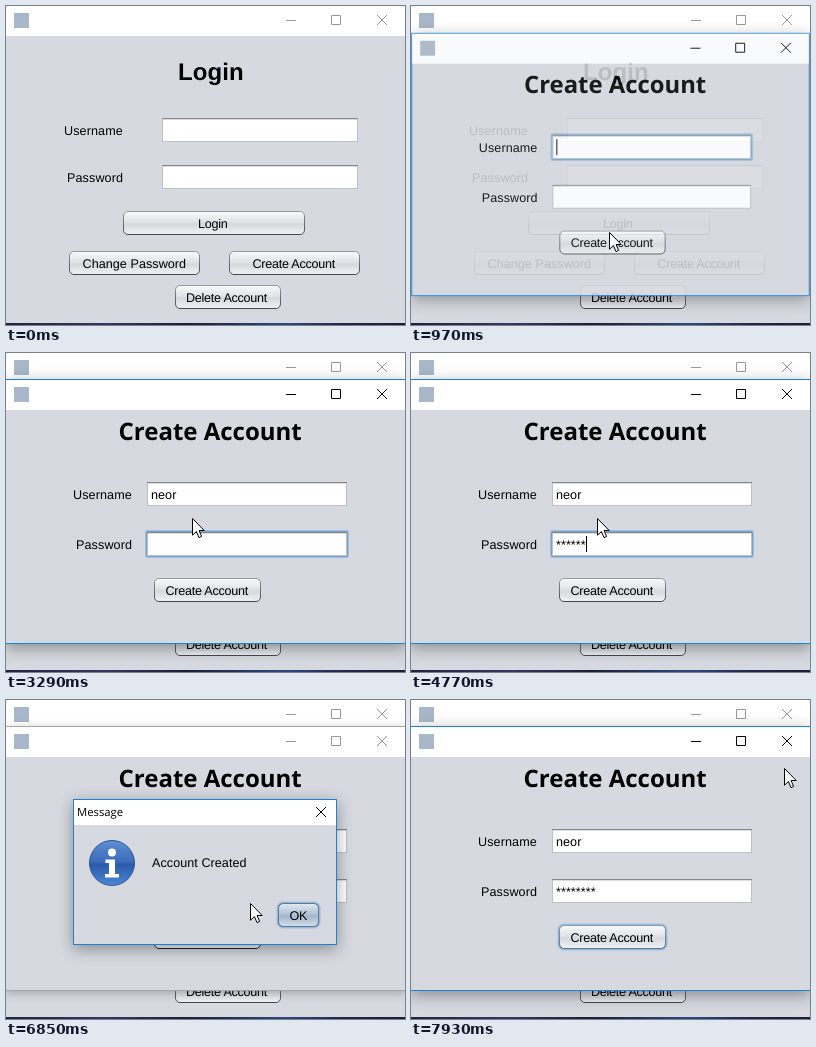
An HTML page that plays this animation: 399x319 px, repeating every 8000 ms.

```html
<!DOCTYPE html>
<html lang="en">
<head>
<meta charset="utf-8">
<title>Create account</title>
<style>
  html, body { margin: 0; width: 100%; height: 100%; overflow: hidden; background: #d6d9df; }
  svg { display: block; width: 399px; height: 319px; }
  text { font: 12.6px "Liberation Sans", Arial, sans-serif; letter-spacing: -.26px; fill: #000; white-space: pre; text-rendering: geometricPrecision; }
  .label { letter-spacing: .1px; }
  .typed { letter-spacing: .05px; }
  .h1 { font-size: 24px; font-weight: bold; letter-spacing: .1px; }
  .h2 { font: bold 24px "Noto Sans", "Open Sans", sans-serif; letter-spacing: 0; }
  .bar { font: 11.3px "Open Sans", "Noto Sans", sans-serif; letter-spacing: 0; }
  .glyphs { fill: none; stroke: #000; }
  .idle .glyphs { stroke: #999; }
  .frame { stroke: #1883d7; filter: drop-shadow(0 4px 8px rgba(0, 0, 0, .36)); }
  .idle > .frame { stroke: #a3a6ab; filter: drop-shadow(0 2px 5px rgba(0, 0, 0, .24)); }
  .btn .body { fill: url(#face); stroke: url(#edge); }
  .ring { fill: none; stroke: none; }
  .focus .ring { stroke: #73a4d1; }
  .focus .halo { stroke-opacity: .5; }
  .btn.hot .body { fill: url(#faceHot); stroke: url(#edgeHot); }
  .btn.down .body { fill: url(#faceDown); stroke: url(#edgeHot); }
  .btn.main .body { fill: url(#faceMain); stroke: #44536a; }
  .btn.main.hot .body { fill: url(#faceMainHot); }
  .btn.main.down .body { fill: url(#faceDown); }
</style>
</head>
<body>
<svg id="stage" viewBox="0 0 399 319"></svg>
<script>
const LOOP = 8000;
const stage = document.getElementById('stage');

const gradient = (id, dir, ...stops) =>
  `<linearGradient id="${id}" ${dir === 'down' ? 'x2="0" y2="1"' : ''}>${stops.map(([at, color]) =>
    `<stop offset="${at}" stop-color="${color}"/>`).join('')}</linearGradient>`;

const text = (x, y, s, cls = '', id = '') => `<text id="${id}" class="${cls}" x="${x}" y="${y}">${s}</text>`;

// Focus ring: a solid line hugging the control and a softer one outside it
const ring = (x, y, w, h, r) => [.5, 1.5].map((d, i) =>
  `<rect class="ring ${i ? 'halo' : ''}" x="${x - d}" y="${y - d}" width="${w + 2 * d}" height="${h + 2 * d}" rx="${r + d}"/>`).join('');

const button = (id, x, y, w, tx, s, cls = '', textCls = '') => `
  <g id="${id}" class="btn ${cls}">
    <rect class="body" x="${x + .5}" y="${y + .5}" width="${w - 1}" height="23" rx="4.5"/>
    ${ring(x + .5, y + .5, w - 1, 23, 4)}
    ${text(tx, y + 17, s, textCls)}
  </g>`;

const field = (id, x, y, w) => `
  <g id="${id}" class="field">
    <rect x="${x + .5}" y="${y + .5}" width="${w - 1}" height="23" fill="#fff" stroke="#bcbfc5"/>
    <path d="M${x} ${y + .5}h${w}" stroke="#85878c"/>
    <path d="M${x + 1} ${y + 1.5}h${w - 2}" stroke="#dcdde0"/>
    ${ring(x, y, w, 24, 0)}
  </g>`;

const controls = y => `
  <rect x="8" y="${y - 7}" width="15" height="15" fill="#a9b8c8"/>
  <path class="glyphs" d="M280 ${y + .5}h10M325.5 ${y - 4.5}h9v9h-9zM371 ${y - 5}l10 10m0-10l-10 10"/>`;

stage.innerHTML = `
  <defs>
    ${gradient('face', 'down', [0, '#fafafb'], [.45, '#e1e3e8'], [.55, '#d5d8de'], [1, '#f1f2f5'])}
    ${gradient('faceHot', 'down', [0, '#fff'], [.45, '#eceef2'], [.55, '#e2e4e9'], [1, '#fafbfc'])}
    ${gradient('faceDown', 'down', [0, '#b4bcc8'], [.5, '#8d99aa'], [1, '#b9c2ce'])}
    ${gradient('faceMain', 'down', [0, '#e3eaf1'], [.45, '#b3c3d4'], [.55, '#a3b6ca'], [1, '#d3e0ec'])}
    ${gradient('faceMainHot', 'down', [0, '#f0f5fa'], [.45, '#c6d4e2'], [.55, '#b7c8d9'], [1, '#e2edf6'])}
    ${gradient('edge', 'down', [0, '#96999f'], [1, '#454951'])}
    ${gradient('edgeHot', 'down', [0, '#676b74'], [1, '#1f2229'])}
    ${gradient('info', 'down', [0, '#5f8fd3'], [.5, '#3a69b8'], [.52, '#2c59a8'], [1, '#4c86d6'])}
    ${gradient('desk', 'across', [0, '#20243f'], [.25, '#3a3564'], [.45, '#1b2036'], [.7, '#2c4a80'], [.85, '#23264a'], [1, '#1b2036'])}
  </defs>

  <g id="login" class="idle">
    <rect width="399" height="319" fill="#d6d9df"/>
    <rect width="399" height="30" fill="#fff"/>
    ${controls(14)}
    ${text(172, 74, 'Login', 'h1')}
    ${text(58, 129, 'Username', 'label')}
    ${text(61, 176, 'Password', 'label')}
    ${field('', 156, 112, 196)}
    ${field('', 156, 159, 196)}
    ${button('', 117, 205, 182, 192, 'Login')}
    ${button('', 63, 245, 131, 76.5, 'Change Password', '', 'typed')}
    ${button('open', 223, 245, 131, 246.5, 'Create Account')}
    ${button('', 169, 279, 106, 180, 'Delete Account')}
    <rect y="317" width="399" height="2" fill="url(#desk)"/>
  </g>

  <g id="create">
    <rect class="frame" x="-.5" y="26.5" width="400" height="264" fill="#d6d9df"/>
    <rect y="27" width="399" height="30" fill="#fff"/>
    ${controls(41)}
    ${text(112.5, 87, 'Create Account', 'h2')}
    ${text(67, 146, 'Username', 'label')}
    ${text(70, 196, 'Password', 'label')}
    ${field('nameField', 141, 129, 200)}
    ${field('passField', 141, 179, 200)}
    ${text(145, 146, '', 'typed', 'nameText')}
    ${text(145, 196, '', 'typed', 'passText')}
    <rect id="caret" width="1" height="16"/>
    ${button('submit', 148, 225, 107, 159.5, 'Create Account')}
  </g>

  <g id="message">
    <rect class="frame" x="67.5" y="99.5" width="263" height="145" fill="#d6d9df"/>
    <rect x="68" y="100" width="262" height="25" fill="#fff"/>
    ${text(71, 116, 'Message', 'bar')}
    <path class="glyphs" d="M310 107l10 10m0-10l-10 10"/>
    <circle cx="106" cy="163" r="22.5" fill="url(#info)" stroke="#2d559c"/>
    <circle cx="106" cy="152.5" r="4" fill="#fff"/>
    <path d="M99.5 159.500h9.500v14.500h4v3.500h-14v-3.500h4v-11h-3.500z" fill="#fff"/>
    ${text(146, 167, 'Account Created', 'typed')}
    ${button('ok', 272, 203, 41, 283.5, 'OK', 'main focus')}
  </g>

  <path id="cursor" d="M.5 .5V17.200L4.400 13.500 7 19.600 9.600 18.500 7.100 12.500H12.200z" fill="#fff" stroke="#000"/>`;

const $ = id => document.getElementById(id);

// The screen only refreshes at these moments: [first, last, steps]
const ticks = [
  [0, 0, 1], [130, 440, 5], [590, 1200, 9], [1370, 1830, 2], [2290, 2290, 1], [2440, 2600, 3],
  [2830, 3290, 2], [3750, 3750, 1], [3900, 3900, 1], [4070, 4070, 1], [4300, 4300, 1], [4450, 4450, 1],
  [4770, 4770, 1], [4920, 4920, 1], [5150, 5150, 1], [5610, 5840, 4], [6010, 6320, 5],
  [6550, 7310, 11], [7390, 7930, 8]
].flatMap(([a, b, n]) => Array.from({ length: n }, (_, i) =>
  n > 1 ? Math.round((a + (b - a) * i / (n - 1)) / 10) * 10 : a));

// Pointer path: [time, x, y]
const path = [
  [0, 299, 330], [130, 296, 306], [440, 288, 258], [740, 286, 256], [970, 198, 226], [1200, 184, 162],
  [1370, 186, 165], [5530, 186, 165], [5840, 129, 264], [6010, 150, 257], [6090, 171, 248],
  [6320, 172, 247], [6550, 185, 240], [6850, 244, 203], [7080, 288, 212], [7310, 288, 212], [7930, 373, 68]
];

const NAME = 'neor';
const NAME_STOPS = [0, 7, 14, 21, 25];
const nameKeys = [2290, 2440, 2520, 2600];
const passKeys = [3750, 3900, 4070, 4300, 4450, 4770, 4920, 5150];

const within = (t, a, b) => t >= a && t < b;
const pressed = (keys, t) => keys.filter(k => k <= t).length;
const ease = (t, a, b) => 1 - (1 - Math.min(1, Math.max(0, (t - a) / (b - a)))) ** 3;
const flag = (id, cls, on) => $(id).classList.toggle(cls, on);

function pointer(t) {
  const i = path.findIndex(p => p[0] > t);
  if (i < 0) return path[path.length - 1].slice(1);
  const [t0, x0, y0] = path[i - 1], [t1, x1, y1] = path[i];
  const p = (t - t0) / (t1 - t0);
  return [Math.round(x0 + (x1 - x0) * p), Math.round(y0 + (y1 - y0) * p)];
}

// Windows appear and vanish with a fade and a slight zoom about their centre
function showWindow(id, p, cx, cy) {
  const s = .95 + .05 * p;
  $(id).setAttribute('opacity', p);
  $(id).setAttribute('transform', p < 1 ? `translate(${cx} ${cy}) scale(${s}) translate(${-cx} ${-cy})` : '');
}

function draw(t) {
  const [x, y] = pointer(t);
  $('cursor').setAttribute('transform', `translate(${x} ${y})`);

  flag('login', 'idle', !within(t, 590, 820));
  flag('open', 'hot', within(t, 360, 900));
  flag('open', 'down', within(t, 590, 740));
  showWindow('create', ease(t, 820, 1120), 199.5, 159);
  flag('create', 'idle', within(t, 6550, 7390));

  const n = pressed(nameKeys, t), m = pressed(passKeys, t);
  const inPass = t >= 2830;
  $('nameText').textContent = NAME.slice(0, n);
  $('passText').textContent = '*'.repeat(m);
  flag('nameField', 'focus', !inPass);
  flag('passField', 'focus', within(t, 2830, 6240));

  const caretOff = within(t, 1370, 1830) || within(t, 3290, 3750) || within(t, 5610, 6010) || t >= 6240;
  $('caret').setAttribute('opacity', caretOff ? 0 : 1);
  $('caret').setAttribute('x', 145 + (inPass ? 5 * m : NAME_STOPS[n]));
  $('caret').setAttribute('y', inPass ? 183 : 133);

  flag('submit', 'hot', within(t, 6080, 7390));
  flag('submit', 'down', within(t, 6240, 6320));
  flag('submit', 'focus', within(t, 6240, 6550) || t >= 7390);

  showWindow('message', t < 7310 ? ease(t, 6500, 6780) : 1 - ease(t, 7270, 7540), 199, 172);
  flag('ok', 'hot', within(t, 7000, 7540));
  flag('ok', 'down', within(t, 7160, 7310));
}

const start = performance.now();
let last = -1;
function frame() {
  const t = (performance.now() - start) % LOOP;
  const tick = ticks.filter(k => k <= t).pop() ?? 0;
  if (tick !== last) draw(last = tick);
  requestAnimationFrame(frame);
}
frame();
</script>
</body>
</html>
```
